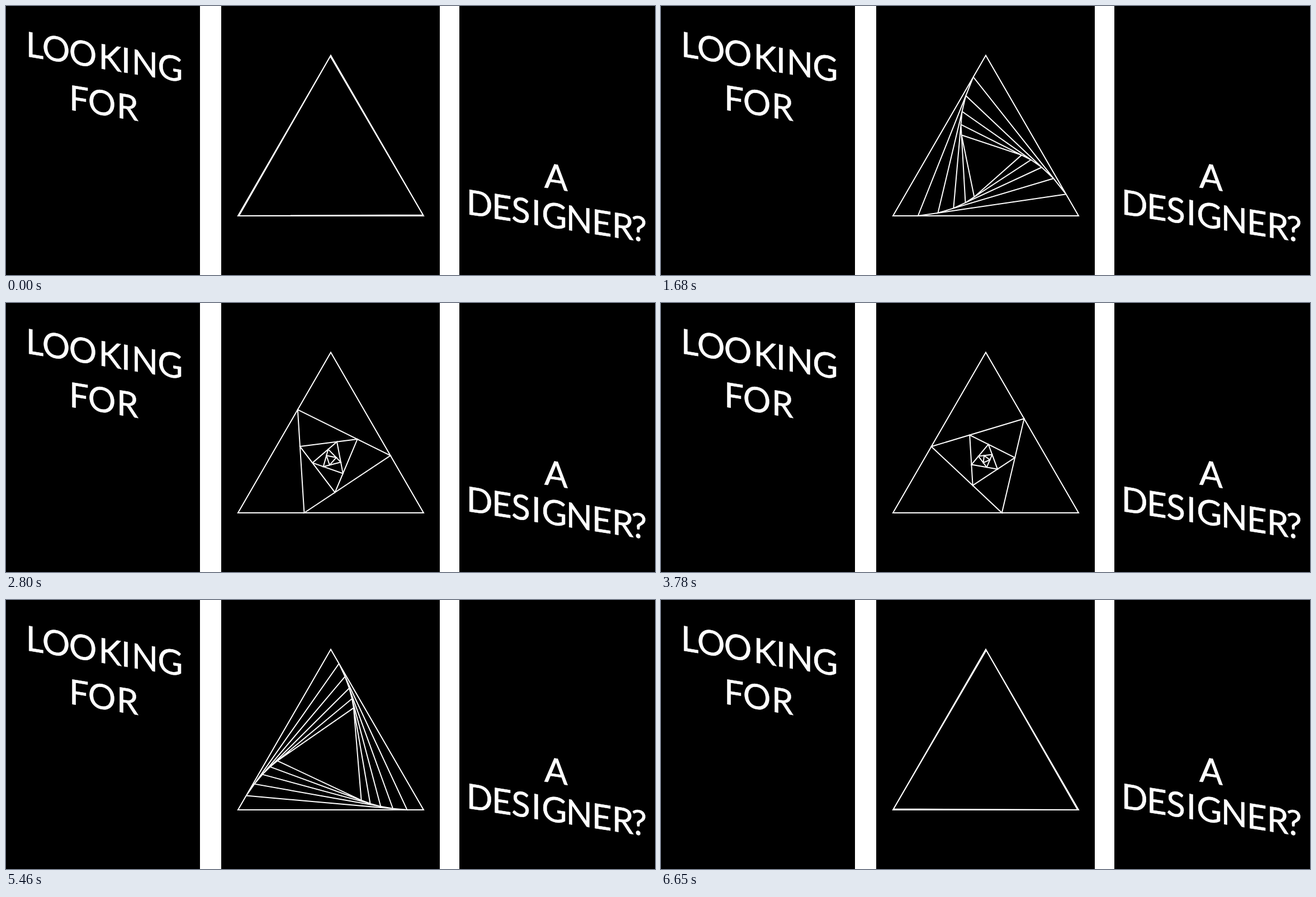
Recreate the animation shown at these times as an HTML page. Size 1161 px wide and 482 px high, loop 6720 ms.

```html
<!DOCTYPE html>
<html lang="en">
<head>
<meta charset="utf-8">
<title>Looking for a designer?</title>
<style>
  html, body { margin: 0; width: 100%; height: 100%; overflow: hidden; background: #fff; }
  svg { display: block; width: 1161px; height: 482px; }
  text {
    font: 400 62px Lato, "Open Sans", sans-serif;
    fill: #fff; stroke: #fff; stroke-width: .6;
    text-anchor: middle;
  }
  #spiral { fill: none; stroke: #fff; stroke-width: 2; stroke-linejoin: miter; }
</style>
</head>
<body>
<svg viewBox="0 0 1161 482">
  <rect width="347" height="482"/>
  <rect x="385" width="391" height="482"/>
  <rect x="811" width="350" height="482"/>
  <g transform="skewY(9.4)">
    <text x="51.5 89.5 137.5 186 214.5 248.5 294" y="84">LOOKING</text>
    <text x="130.5 171.5 217.5" y="167">FOR</text>
  </g>
  <g transform="skewY(8.9)">
    <text x="984" y="174.4">A</text>
    <text x="847 887 921 948.5 981 1025.5 1066 1103.5 1132.5" y="243.9">DESIGNER?</text>
  </g>
  <path id="spiral"/>
</svg>
<script>
const LOOP = 6720, STEP = 70, SPAN = 95.5;
const CX = 581, CY = 280.17, RADIUS = 191.67, DEPTH = 5;
const MARGIN = .001;
const path = document.getElementById('spiral');
const clamp = (v, lo, hi) => Math.min(hi, Math.max(lo, v));

// cubic-bezier(.37, 0, .63, 1)
function ease(t) {
  let s = t;
  for (let i = 0; i < 6; i++) {
    const x = s * (1.11 + s * (-.33 + s * .22));
    s -= (x - t) / (1.11 - .66 * s + .66 * s * s);
  }
  return s * s * (3 - 2 * s);
}

const mix = (a, b, p) => a.map((v, i) => v + (b[i] - v) * p);

const outer = [90, 210, 330].map(deg => {
  const a = deg * Math.PI / 180;
  return [CX + RADIUS * Math.cos(a), CY - RADIUS * Math.sin(a)];
});

// Each triangle has its corners at share p along the sides of the one around it.
function nested(p) {
  let tri = outer, d = '';
  for (let n = 0; n <= DEPTH; n++) {
    d += 'M' + tri.map(pt => pt.map(v => v.toFixed(3)).join(' ')).join('L') + 'Z';
    tri = tri.map((pt, i) => mix(pt, tri[(i + 1) % 3], p));
  }
  return d;
}

function draw(ms) {
  const tick = Math.floor((ms % LOOP) / STEP);
  const t = clamp((tick - 1) / SPAN, 0, 1);
  path.setAttribute('d', nested(clamp(ease(t), MARGIN, 1 - MARGIN)));
}

const start = performance.now();
function loop() {
  draw(performance.now() - start);
  requestAnimationFrame(loop);
}
loop();
</script>
</body>
</html>
```
